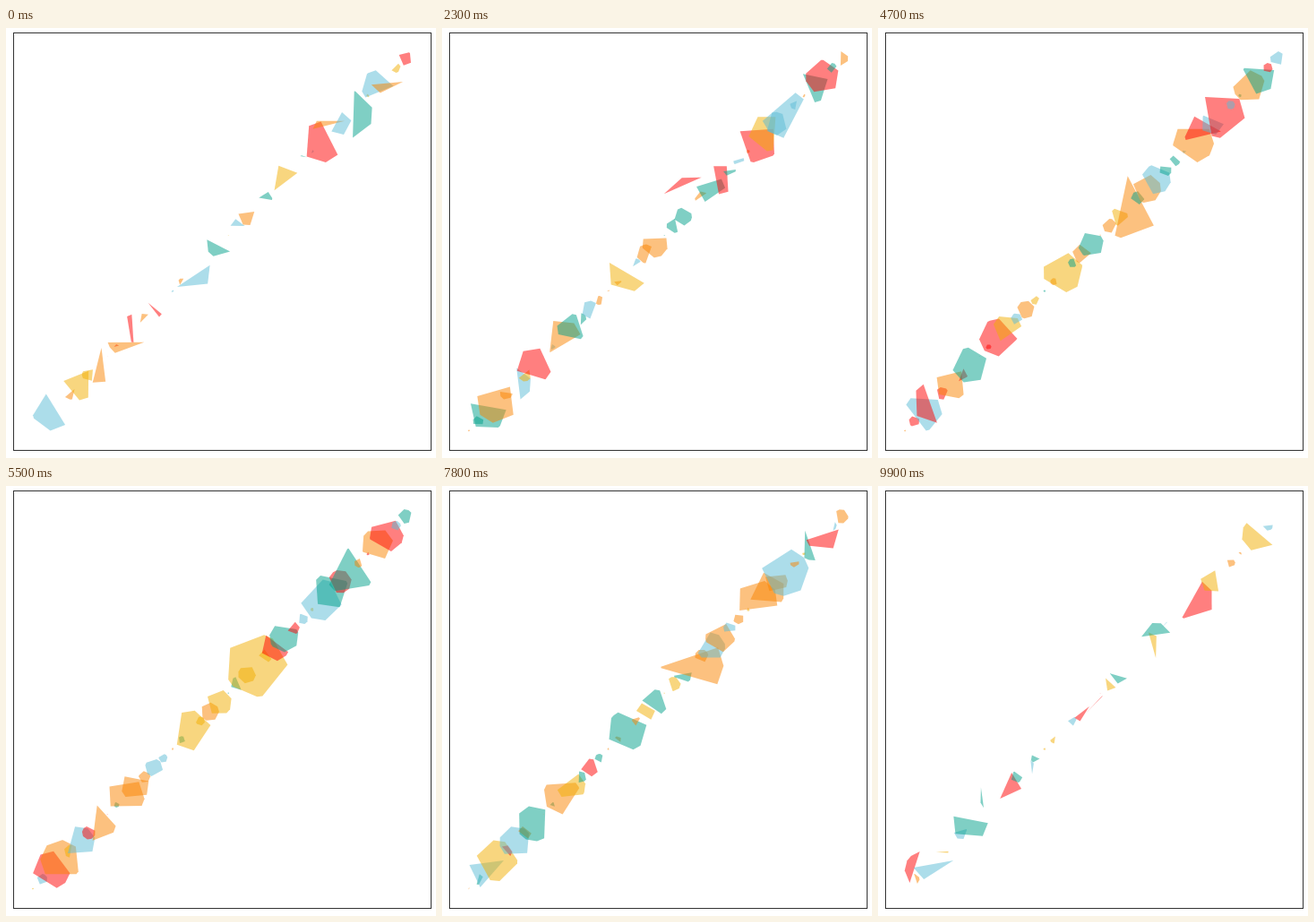
Animation of 480x480 px, one loop 10000 ms. Source, as an HTML page with a canvas:

```html
<!DOCTYPE html>
<html lang="en">
<head>
<meta charset="utf-8">
<title>Polygons on a diagonal</title>
<style>
  html, body { margin: 0; width: 100%; height: 100%; overflow: hidden; background: #fff; }
  canvas { display: block; width: 480px; height: 480px; }
</style>
</head>
<body>
<canvas id="stage"></canvas>
<script>
const SIZE = 480, STEPS = 100, STEP_MS = 100;
const COLORS = { o: '#f98400', t: '#00a08a', y: '#f2ad00', r: '#ff0000', b: '#5bbcd6' };
const MIX = 'ooooootttttyyyyrrrbbb'; // how often each colour is drawn

// Evenly spaced circles along the diagonal; every polygon has its corners on its circle.
const RADII = [
  1, 6, 21, 23, 7, 18, 7.5, 20, 0.4, 3,
  21, 16, 6.5, 10, 5, 1.3, 4, 22.5, 5, 10.5,
  14.5, 0.8, 8, 10, 35, 7.5, 16, 16.5, 7, 6,
  2, 23, 20.5, 13, 26.5, 5, 1.8, 18, 19, 5.5, 8
];
const circles = RADII.map((r, i) => ({ x: 30 + 10.39 * i, y: 449.4 - 10.385 * i, r }));

function seeded(seed) {
  let s = seed >>> 0;
  return () => {
    s = (s + 0x6d2b79f5) >>> 0;
    let v = Math.imul(s ^ (s >>> 15), s | 1);
    v ^= v + Math.imul(v ^ (v >>> 7), v | 61);
    return ((v ^ (v >>> 14)) >>> 0) / 4294967296;
  };
}

// Corners are few and uneven at the ends of the loop, more and evener in the middle.
function randomCorners(rnd, step) {
  const mid = Math.sin(Math.PI * step / STEPS);
  const count = Math.floor(2.2 + 4 * rnd() + 2.6 * mid);
  const jitter = 3 - 1.6 * mid;
  const turn = rnd();
  return Array.from({ length: count }, (_, k) =>
    2 * Math.PI * ((turn + (k + rnd() * jitter) / count) % 1)
  ).sort((a, b) => a - b);
}

const canvas = document.getElementById('stage');
const ctx = canvas.getContext('2d');
const scale = window.devicePixelRatio || 1;
canvas.width = canvas.height = Math.round(SIZE * scale);
ctx.scale(scale, scale);

function polygon({ x, y, r }, angles, color) {
  ctx.beginPath();
  angles.forEach(a => ctx.lineTo(x + r * Math.cos(a), y + r * Math.sin(a)));
  ctx.fillStyle = color;
  ctx.fill();
}

function draw(step) {
  ctx.globalAlpha = 1;
  ctx.fillStyle = '#fff';
  ctx.fillRect(0, 0, SIZE, SIZE);

  ctx.globalAlpha = 0.5;
  circles.forEach((circle, i) => {
    const rnd = seeded(step * 7919 + i * 104729 + 17);
    const hue = MIX[Math.floor(rnd() * MIX.length)];
    polygon(circle, randomCorners(rnd, step), COLORS[hue]);
  });

  ctx.globalAlpha = 1;
  ctx.strokeStyle = '#333';
  ctx.lineWidth = 1;
  ctx.strokeRect(8.5, 5.5, 466, 466);
}

const begin = performance.now();
let shown = -1;
function tick() {
  const step = Math.floor((performance.now() - begin) / STEP_MS) % STEPS;
  if (step !== shown) draw(shown = step);
  requestAnimationFrame(tick);
}
tick();
</script>
</body>
</html>
```
